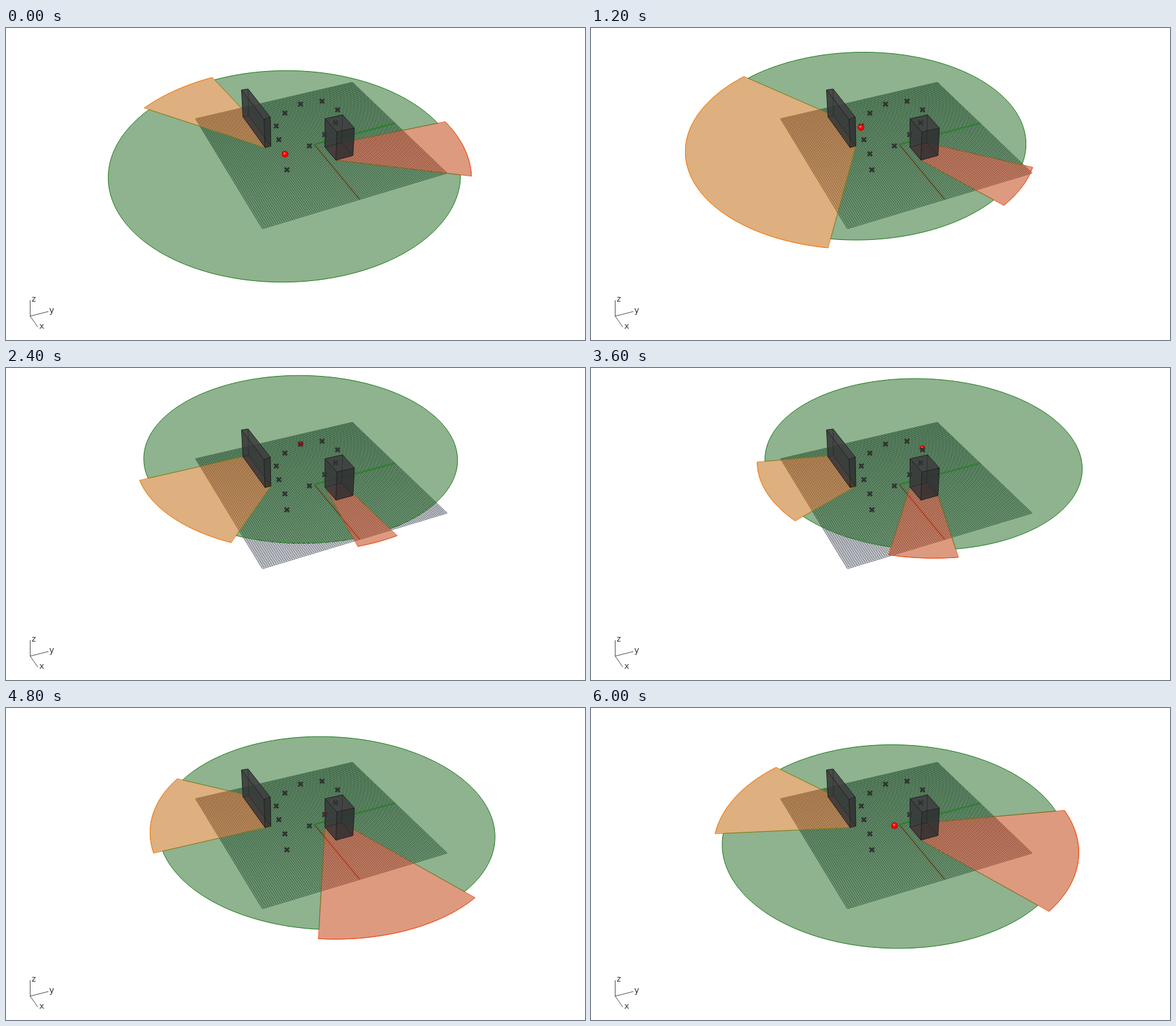
An HTML page with a canvas for the animation above (6600 ms loop, 874 by 471 pixels).

```html
<!DOCTYPE html>
<html lang="en">
<head>
<meta charset="utf-8">
<title>Visibility study</title>
<style>
html, body { margin: 0; width: 100%; height: 100%; overflow: hidden; background: #fff; }
canvas { display: block; }
</style>
</head>
<body>
<canvas id="stage" width="874" height="471"></canvas>
<script>
const W = 874, H = 471, STEP = 600, TAU = Math.PI * 2;
const ctx = document.getElementById('stage').getContext('2d');

// Ground plane (s, t in 0..1 over the grid) to screen.
function ground(s, t) {
  const w = 1 - 0.19709 * s + 0.09083 * t;
  return [(24.73 * s + 284.5 * t + 286) / w, (106.28 * s - 47.55 * t + 137) / w];
}

// Screen to ground plane.
function unproject(x, y) {
  const a = 24.73 + 0.19709 * x, b = 284.5 - 0.09083 * x, c = x - 286;
  const d = 106.28 + 0.19709 * y, e = -47.55 - 0.09083 * y, f = y - 137;
  const det = a * e - b * d;
  return [(c * e - b * f) / det, (a * f - d * c) / det];
}

const DISC = 0.897, REACH = 0.943, SHIFT = 0.013;
const GREEN = '#1f7a1f';

// Viewer stops: x, y, ball radius, ball drawn above its mark
const stops = [
  [421.3, 190.5, 5, 1], [412, 169.5, 5, 1], [407.5, 150.2, 5, 1], [421, 130, 4, 0],
  [444.8, 114.2, 4, 0], [477.3, 111, 4, 0], [500, 120.8, 4, 0], [499, 140.5, 3.5, 0],
  [482.5, 159.6, 3, 0], [424, 213.6, 5.3, 1], [458.3, 177.5, 5, 1]
];
const marks = [
  [421, 190], [412, 168.5], [408, 148], [421, 128.5], [444.5, 115], [477, 110.5],
  [500.5, 123.5], [497.5, 143], [481, 161], [424, 214], [458, 178]
];

// Base corners run: far left, near left, near right, far right.
function block(s0, s1, t0, t1, top, fill, line) {
  const foot = [[s0, t0], [s1, t0], [s1, t1], [s0, t1]];
  return { foot, base: foot.map(p => ground(...p)), top, fill, line };
}
const blocks = [
  block(0.0905, 0.42, 0.2502, 0.2835,
    [[355.5, 93.5], [389.5, 138], [399, 134.5], [365.5, 92]],
    'rgba(189,97,0,0.5)', '#f57c14'),
  block(0.546, 0.673, 0.54, 0.64,
    [[481.5, 137], [499.5, 157], [526, 151], [508, 131]],
    'rgba(187,55,0,0.5)', '#f04a1a')
];

function poly(points, close = true) {
  const path = new Path2D();
  points.forEach((p, i) => i ? path.lineTo(p[0], p[1]) : path.moveTo(p[0], p[1]));
  if (close) path.closePath();
  return path;
}

function stroke(path, color, width = 1, alpha = 1, g = ctx) {
  g.globalAlpha = alpha;
  g.strokeStyle = color;
  g.lineWidth = width;
  g.stroke(path);
  g.globalAlpha = 1;
}

function fill(path, color) {
  ctx.fillStyle = color;
  ctx.fill(path);
}

function makeGrid() {
  const layer = document.createElement('canvas');
  layer.width = W;
  layer.height = H;
  const g = layer.getContext('2d'), cells = 100;
  for (let i = 0; i <= cells; i++) {
    const k = i / cells;
    stroke(poly([ground(k, 0), ground(k, 1)], false), 'rgb(105,110,122)', 0.95, 1, g);
    stroke(poly([ground(0, k), ground(1, k)], false), 'rgb(105,110,122)', 0.9, 1, g);
  }
  stroke(poly([ground(0.5, 0.5), ground(1, 0.5)], false), 'rgb(165,45,45)', 1.5, 1, g);
  stroke(poly([ground(0.5, 0.5), ground(0.5, 1)], false), 'rgb(70,165,70)', 2, 1, g);
  return layer;
}
const grid = makeGrid();

function circle(s, t, r) {
  const pts = [];
  for (let i = 0; i < 180; i++) {
    const a = i / 180 * TAU;
    pts.push(ground(s + r * Math.cos(a), t + r * Math.sin(a)));
  }
  return poly(pts);
}

// The area hidden from (s, t) behind a block, out to the reach circle.
function shadow(b, s, t) {
  const mid = Math.atan2((b.foot[0][1] + b.foot[2][1]) / 2 - t,
                         (b.foot[0][0] + b.foot[2][0]) / 2 - s);
  const seen = b.foot.map(([x, y], i) => {
    let turn = Math.atan2(y - t, x - s) - mid;
    turn -= TAU * Math.round(turn / TAU);
    return { turn, p: b.base[i], dist: Math.hypot(x - s, y - t) };
  }).sort((m, n) => m.turn - n.turn);
  const lo = seen[0], hi = seen[3];
  const near = seen.reduce((m, n) => n.dist < m.dist ? n : m);
  const arc = [];
  for (let i = 0; i <= 60; i++) {
    const a = mid + lo.turn + (hi.turn - lo.turn) * i / 60;
    const c = Math.cos(a) * SHIFT;
    const k = c + Math.sqrt(REACH * REACH - SHIFT * SHIFT + c * c);
    arc.push(ground(s + k * Math.cos(a), t + k * Math.sin(a)));
  }
  return { area: poly([lo.p, ...arc, hi.p, near.p]), rim: poly(arc, false) };
}

function drawBlock({ base, top }) {
  const face = (pts, c) => fill(poly(pts), c);
  face([top[0], top[1], base[1], base[0]], 'rgba(54,54,56,0.86)');
  face([top[1], top[2], base[2], base[1]], 'rgba(46,46,48,0.86)');
  face(top, 'rgba(62,62,64,0.88)');
  for (let i = 0; i < 4; i++) {
    const n = (i + 1) % 4;
    stroke(poly([base[i], base[n]], false), '#1c1c1c', 1, i > 1 ? 0.5 : 0.9);
    stroke(poly([top[i], top[n]], false), '#1c1c1c', 1, 0.9);
    stroke(poly([base[i], top[i]], false), '#1c1c1c', 1, i > 2 ? 0.5 : 0.9);
  }
}

function drawMark([x, y]) {
  const r = 3.3;
  stroke(poly([[x - r, y - r], [x + r, y + r]], false), '#2e3330', 2.8);
  stroke(poly([[x - r, y + r], [x + r, y - r]], false), '#2e3330', 2.8);
}

function drawBall([x, y, r]) {
  const shade = ctx.createRadialGradient(x - 1, y - 1.5, 0.3, x, y, r);
  shade.addColorStop(0, '#ff9a9a');
  shade.addColorStop(0.3, '#ff1010');
  shade.addColorStop(0.75, '#f00000');
  shade.addColorStop(1, '#a80000');
  ctx.fillStyle = shade;
  ctx.beginPath();
  ctx.arc(x, y, r, 0, TAU);
  ctx.fill();
}

function drawCompass() {
  for (const end of [[36.5, 411], [64, 428], [48, 451.5]])
    stroke(poly([[36.5, 435], end], false), '#555');
  ctx.fillStyle = '#333';
  ctx.font = '13px "DejaVu Sans Mono", monospace';
  ctx.fillText('z', 38, 413);
  ctx.fillText('y', 65, 430);
  ctx.fillText('x', 50, 454);
}

function draw(step) {
  const stop = stops[step];
  const [s, t] = unproject(stop[0], stop[1]);
  const disc = circle(s, t, DISC);
  const shades = blocks.map(b => shadow(b, s, t));

  ctx.fillStyle = '#fff';
  ctx.fillRect(0, 0, W, H);
  ctx.drawImage(grid, 0, 0);

  // Visible part of the disc
  ctx.save();
  for (const { area } of shades) {
    const outside = new Path2D();
    outside.rect(0, 0, W, H);
    outside.addPath(area);
    ctx.clip(outside, 'evenodd');
  }
  fill(disc, 'rgba(1,84,0,0.443)');
  stroke(disc, GREEN);
  ctx.restore();

  shades.forEach(({ area, rim }, i) => {
    const b = blocks[i];
    fill(area, b.fill);
    stroke(area, b.line, 1, 0.8);
    ctx.save();
    ctx.clip(disc);
    stroke(area, GREEN, 1, 0.6);
    ctx.restore();
    stroke(rim, b.line);
  });

  if (!stop[3]) drawBall(stop);
  blocks.forEach(drawBlock);
  marks.forEach(drawMark);
  if (stop[3]) drawBall(stop);
  drawCompass();
}

const start = performance.now();
let shown = -1;
function tick() {
  const step = Math.floor((performance.now() - start) / STEP) % stops.length;
  if (step !== shown) draw(shown = step);
  requestAnimationFrame(tick);
}
tick();
</script>
</body>
</html>
```
